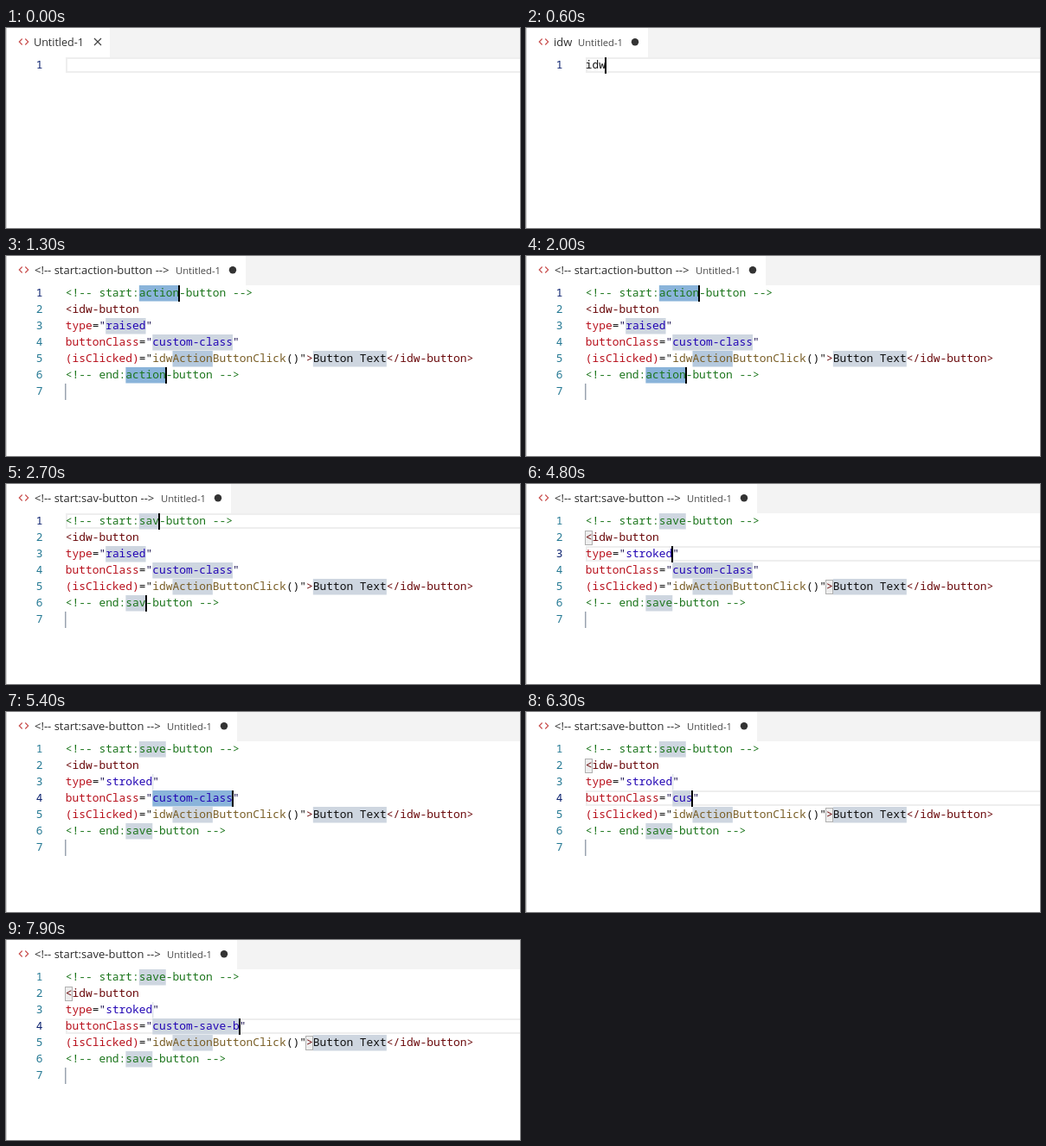
These frames come from a looping animation (594 by 232 pixels, 8000 ms). An HTML page:

```html
<!DOCTYPE html>
<html lang="en">
<head>
<meta charset="utf-8">
<title>Snippet editor</title>
<style>
html, body { margin: 0; width: 100%; height: 100%; overflow: hidden; background: #fff; }
svg { display: block; width: 594px; height: 232px; }
text { white-space: pre; }
.code { font: 12.88px "Noto Sans Mono", "DejaVu Sans Mono", monospace; }
.ui { font-family: "Open Sans", "Noto Sans", sans-serif; }
</style>
</head>
<body>
<svg id="stage" viewBox="0 0 594 232"></svg>
<script>
const LOOP = 8000, X0 = 68.8, CW = 7.73, TOP = 34, ROW = 19;
const C = {
  comment: '#1b751b', tag: '#6b0a0c', attr: '#b8101c', str: '#2205b4', quote: '#1c1450', fn: '#795e26', text: '#111',
  hole: '#ced6e0', selected: '#8ab4da', match: '#b4c8dd', caret: '#000'
};
const TYPES = ['raised', 'stroked', 'fab', 'mini-fab'];
const SNIPPETS = ['idw-button', 'idw-checkbox', 'idw-input'];

// Each step overrides part of the state from its time on.
const STEPS = [
  [0, { typed: '', doc: false, line: 1, focus: 'plain', menu: null, name: 'action', type: 'raised', cls: 'custom-class' }],
  [200, { typed: 'i', desc: 42 }],
  [300, { typed: 'id', desc: 50 }],
  [500, { typed: 'idw', desc: 60 }],
  [700, { menu: 'snippets', pick: 0 }],
  [1300, { doc: true, menu: null, focus: 'name', selecting: true, desc: 196 }],
  [2200, { name: 's', selecting: false, desc: 165 }],
  [2500, { name: 'sa', desc: 172 }],
  [2700, { name: 'sav', desc: 179 }],
  [2900, { name: 'save', desc: 186 }],
  [3200, { focus: 'type', line: 3, menu: 'types', pick: 0 }],
  [3600, { pick: 1 }],
  [4300, { type: 'stroked', menu: null }],
  [5100, { focus: 'cls', line: 4, selecting: true }],
  [6000, { cls: 'c', selecting: false }],
  [6200, { cls: 'cu' }],
  [6300, { cls: 'cus' }],
  [6500, { cls: 'cust' }],
  ...typing(6800, 'custom-sa', 5),
  ...typing(7600, 'custom-save-b', 4)
];

function typing(start, word, count) {
  return Array.from({ length: count }, (_, i) =>
    [start + i * 100, { cls: word.slice(0, word.length - count + 1 + i) }]);
}

const stage = document.getElementById('stage');
const colX = col => X0 + col * CW;
const rowY = line => TOP + (line - 1) * ROW;

function add(tag, attrs, content) {
  const el = document.createElementNS('http://www.w3.org/2000/svg', tag);
  for (const key in attrs) el.setAttribute(key, attrs[key]);
  if (content) el.textContent = content;
  stage.appendChild(el);
}
const rect = (x, y, width, height, fill, more) => add('rect', { x, y, width, height, fill, ...more });
const path = (d, stroke, width = 1) => add('path', { d, stroke, fill: 'none', 'stroke-width': width });
const code = (x, y, fill, str, more) => add('text', { x, y, fill, class: 'code', ...more }, str);
const label = (x, size, fill, str) => add('text', { x, y: 21, fill, class: 'ui', 'font-size': size }, str);

const mark = (line, from, to, fill) => rect(colX(from), rowY(line), (to - from) * CW, 18.5, fill);
const caret = (line, col) => rect(Math.round(colX(col)) - 1, rowY(line), 2, ROW, C.caret);
const bracket = (line, col) => rect(Math.round(colX(col)) - 0.5, rowY(line) + 1.5, 8, 16, '#eeeeee',
  { stroke: '#b0b0b0', 'stroke-width': 1 });

function codeLine(line, ...parts) {
  let col = 0;
  for (const [color, str] of parts) {
    code(colX(col), rowY(line) + 13.3, C[color], str);
    col += str.length;
  }
}

function tab(s) {
  const dirty = s.doc || s.typed;
  const end = dirty ? s.desc + 81 : 120;
  rect(0, 0, 594, 34, '#f3f3f3');
  rect(1, 0, end - 1, 34, '#fff');
  rect(0, 0, 1, 232, '#cfcfcf');
  path('M18.7 12.5L15.3 16L18.7 19.5M22.3 12.5L25.7 16L22.3 19.5', '#c9504f', 1.2);
  if (!dirty) {
    label(32, 12.55, '#333', 'Untitled-1');
    path('M102 12L110 20M110 12L102 20', '#424242', 1.2);
    return;
  }
  label(s.doc ? 33 : 32, 13, '#2b2b2b', s.doc ? `<!-- start:${s.name}-button -->` : s.typed);
  label(s.desc, 11.25, '#4a4a4a', 'Untitled-1');
  add('circle', { cx: s.desc + 66, cy: 16.2, r: 4.2, fill: '#333' });
}

function marks(s) {
  const picked = key => s.selecting && s.focus === key ? C.selected : C.hole;
  const n = s.name.length;
  mark(1, 11, 11 + n, picked('name'));
  mark(6, 9, 9 + n, picked('name'));
  if (s.type === 'raised') mark(3, 6, 12, C.hole);
  else rect(colX(13), rowY(3), 1, 18.5, C.hole);
  mark(4, 13, 13 + s.cls.length, picked('cls'));
  mark(5, 16, 22, s.selecting && s.focus === 'name' ? C.match : C.hole);
  mark(5, 37, 48, C.hole);
  rect(68, rowY(7), 1.5, ROW, '#9aa3b0');
  if (s.line > 1 && !s.selecting) {
    bracket(2, 0);
    bracket(5, 36);
  }
}

function source(s) {
  const quoted = str => [['quote', '"'], ['str', str], ['quote', '"']];
  codeLine(1, ['comment', `<!-- start:${s.name}-button -->`]);
  codeLine(2, ['tag', '<idw-button']);
  codeLine(3, ['attr', 'type'], ['text', '='], ...quoted(s.type));
  codeLine(4, ['attr', 'buttonClass'], ['text', '='], ...quoted(s.cls));
  codeLine(5, ['attr', '(isClicked)'], ['text', '="'], ['fn', 'idwActionButtonClick'],
    ['text', '()"'], ['tag', '>'], ['text', 'Button Text'], ['tag', '</idw-button>']);
  codeLine(6, ['comment', `<!-- end:${s.name}-button -->`]);
}

function carets(s) {
  if (s.focus === 'name') {
    caret(1, 11 + s.name.length);
    caret(6, 9 + s.name.length);
  } else if (s.focus === 'type') {
    caret(3, s.menu ? 6 : 6 + s.type.length);
  } else if (s.focus === 'cls') {
    caret(4, 13 + s.cls.length);
  } else if (s.typed) {
    caret(1, s.typed.length);
  }
}

function enumIcon(x, y) {
  const ink = '#c27d1a';
  rect(x + 5.5, y + 3.5, 8, 6, '#f8ead6', { stroke: ink });
  rect(x + 0.5, y + 7.5, 8, 6, '#f8ead6', { stroke: ink });
  path(`M${x + 7} ${y + 6}h5M${x + 2} ${y + 10}h5`, ink);
}

function snippetIcon(x, y) {
  path(`M${x + 2.5} ${y + 13}V${y + 3.5}H${x + 12.5}V${y + 13}`, '#424242');
  path(`M${x + 2} ${y + 14.5}h2m2 0h3m2 0h2`, '#424242');
}

function menu(s) {
  const types = s.menu === 'types';
  const items = types ? TYPES : SNIPPETS;
  const x = types ? 114.5 : 91.5, y = rowY(s.line) + ROW - 0.5;
  rect(x, y, 434, items.length * ROW + 3, '#f3f3f3', { stroke: '#c8c8c8' });
  items.forEach((item, i) => {
    const top = y + 1 + i * ROW, tx = x + 23.5;
    if (i === s.pick) rect(x + 0.5, top, 433, ROW, '#d6ebff');
    (types ? enumIcon : snippetIcon)(x + 4, top + 1);
    const hit = types ? 0 : s.typed.length;
    if (hit) code(tx, top + 13.3, '#0066bf', item.slice(0, hit), { 'font-weight': 700 });
    code(tx + hit * CW, top + 13.3, '#1e1e1e', item.slice(hit));
  });
}

function draw(s) {
  stage.textContent = '';
  rect(0, 0, 594, 232, '#fff');
  tab(s);
  if (!s.selecting) {
    rect(70, rowY(s.line) + 1, 540, 16, 'none', { stroke: '#eeeeee', 'stroke-width': 2 });
  }
  for (let i = 1; i <= (s.doc ? 7 : 1); i++) {
    code(42.4, rowY(i) + 13.3, i === s.line ? '#0b216f' : '#237893', String(i), { 'text-anchor': 'end' });
  }
  if (s.doc) {
    marks(s);
    source(s);
  } else if (s.typed) {
    codeLine(1, ['text', s.typed]);
  }
  carets(s);
  if (s.menu) menu(s);
}

let shown = -1;
const begin = performance.now();

function tick() {
  const t = (performance.now() - begin) % LOOP;
  const count = STEPS.filter(([at]) => at <= t).length;
  if (count !== shown) {
    shown = count;
    draw(Object.assign({}, ...STEPS.slice(0, count).map(step => step[1])));
  }
  requestAnimationFrame(tick);
}
tick();
</script>
</body>
</html>
```
